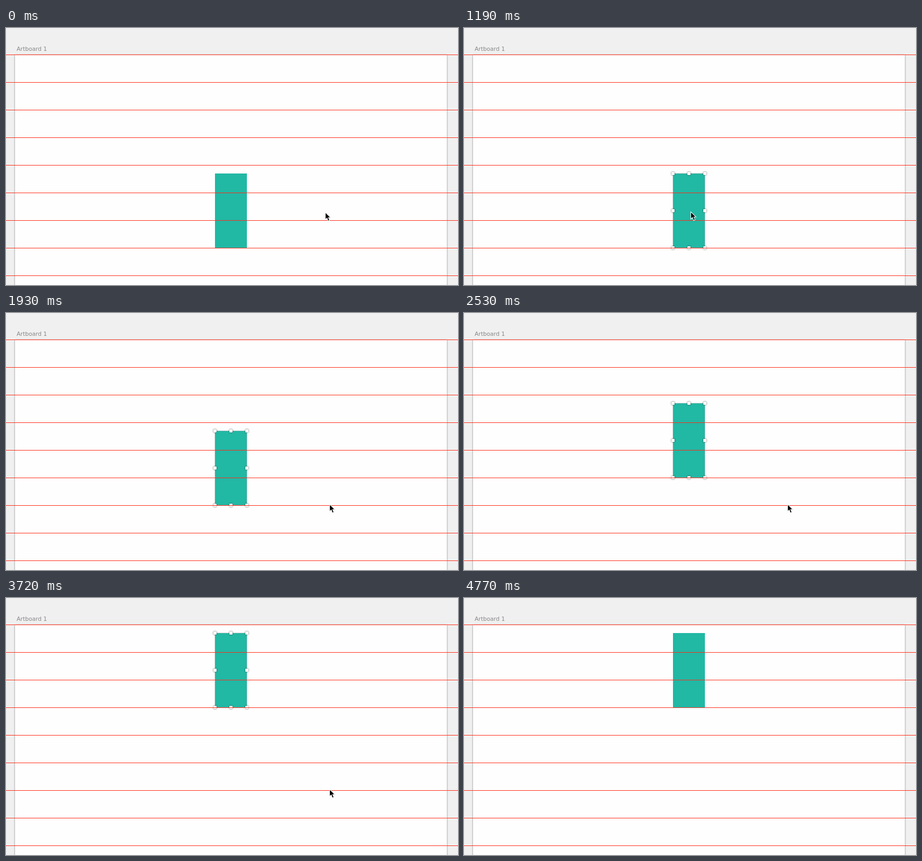
Animation, 850 px wide and 484 px high, one loop 5.2 s. Source, as an HTML page:

```html
<!DOCTYPE html>
<html lang="en">
<head>
<meta charset="utf-8">
<title>Moving a shape along the grid</title>
<style>
  html, body { margin: 0; width: 100%; height: 100%; overflow: hidden; background: #f0f0f0; }
  svg { display: block; width: 850px; height: 484px; }
  #board { fill: #fefefe; filter: drop-shadow(0 1px 1.5px rgba(0, 0, 0, .5)); }
  #label { font: 10.7px "DejaVu Sans", sans-serif; fill: #868686; }
  #hover { fill: none; stroke: #44adf0; stroke-width: 2; }
  #edge { fill: none; stroke: #999; stroke-opacity: .5; }
  #handles { fill: #f8f8f8; filter: drop-shadow(0 .5px .8px rgba(0, 0, 0, .75)); }
  #guides { fill: #ff2d1a; }
  #cursor { filter: drop-shadow(0 .5px .5px rgba(0, 0, 0, .3)); }
</style>
</head>
<body>
<svg viewBox="0 0 850 484">
  <rect id="board" x="17" y="50" width="812" height="450"/>
  <text id="label" x="20" y="43">Artboard 1</text>
  <g id="shape">
    <rect width="60" height="140" fill="#21b8a4"/>
    <rect id="hover" width="60" height="140"/>
    <g id="selection">
      <rect id="edge" width="60" height="140"/>
      <g id="handles"></g>
    </g>
  </g>
  <g id="guides"></g>
  <g id="cursor">
    <path fill="#fff" d="M-1 0V16L2.4 13.2L4.5 18.2L8.1 16.7L6 11.6H10.6Z"/>
    <path d="M0 2.4V13.6L2.9 10.9L5 16.8L6.8 16L4.5 10.6H8.2Z"/>
  </g>
</svg>
<script>
const LOOP = 5200, TICK = 149, STEP = 52;
const $ = id => document.getElementById(id);
const clamp = (v, lo, hi) => Math.min(hi, Math.max(lo, v));

// Pointer glides, timed in ticks
const home = { x: 601, y: 346 };
const glides = [
  { start: 2.59, length: 2.41, x: 435, y: 344 },
  { start: 5, length: 1, x: 427, y: 345 },
  { start: 8.2, length: 1.94, x: 609, y: 359 },
  { start: 27, length: 1.5, x: 613, y: 359 },
  { start: 30, length: 1.65, x: 897, y: 525 }
];

function pointerAt(tick) {
  let { x, y } = home;
  for (const glide of glides) {
    const u = clamp((tick - glide.start) / glide.length, 0, 1);
    const eased = u * u * (3 - 2 * u);
    x += (glide.x - x) * eased;
    y += (glide.y - y) * eased;
  }
  return [Math.round(x), Math.round(y)];
}

function addRect(parent, x, y, width, height, rx = 0) {
  const rect = document.createElementNS('http://www.w3.org/2000/svg', 'rect');
  Object.entries({ x, y, width, height, rx }).forEach(([k, v]) => rect.setAttribute(k, v));
  parent.append(rect);
}

for (let y = 50; y < 484; y += STEP) addRect($('guides'), 0, y, 850, 1);
for (const x of [0, 30, 60])
  for (const y of [0, 70, 140])
    if (x !== 30 || y !== 70) addRect($('handles'), x - 3, y - 3, 6, 6, 1);

const move = (el, x, y) => el.setAttribute('transform', `translate(${x} ${y})`);
const show = (el, on) => { el.style.display = on ? '' : 'none'; };

const begin = performance.now();

function draw() {
  // The picture advances in whole ticks, like a screen recording
  const tick = Math.floor(((performance.now() - begin) % LOOP + 10) / TICK);
  const nudges = clamp(Math.floor((tick - 9) / 4), 0, 4);
  move($('cursor'), ...pointerAt(tick));
  move($('shape'), 393, 274 - STEP * nudges);
  show($('hover'), tick >= 5 && tick < 8);
  show($('selection'), tick >= 8 && tick < 30);
  requestAnimationFrame(draw);
}
draw();
</script>
</body>
</html>
```
